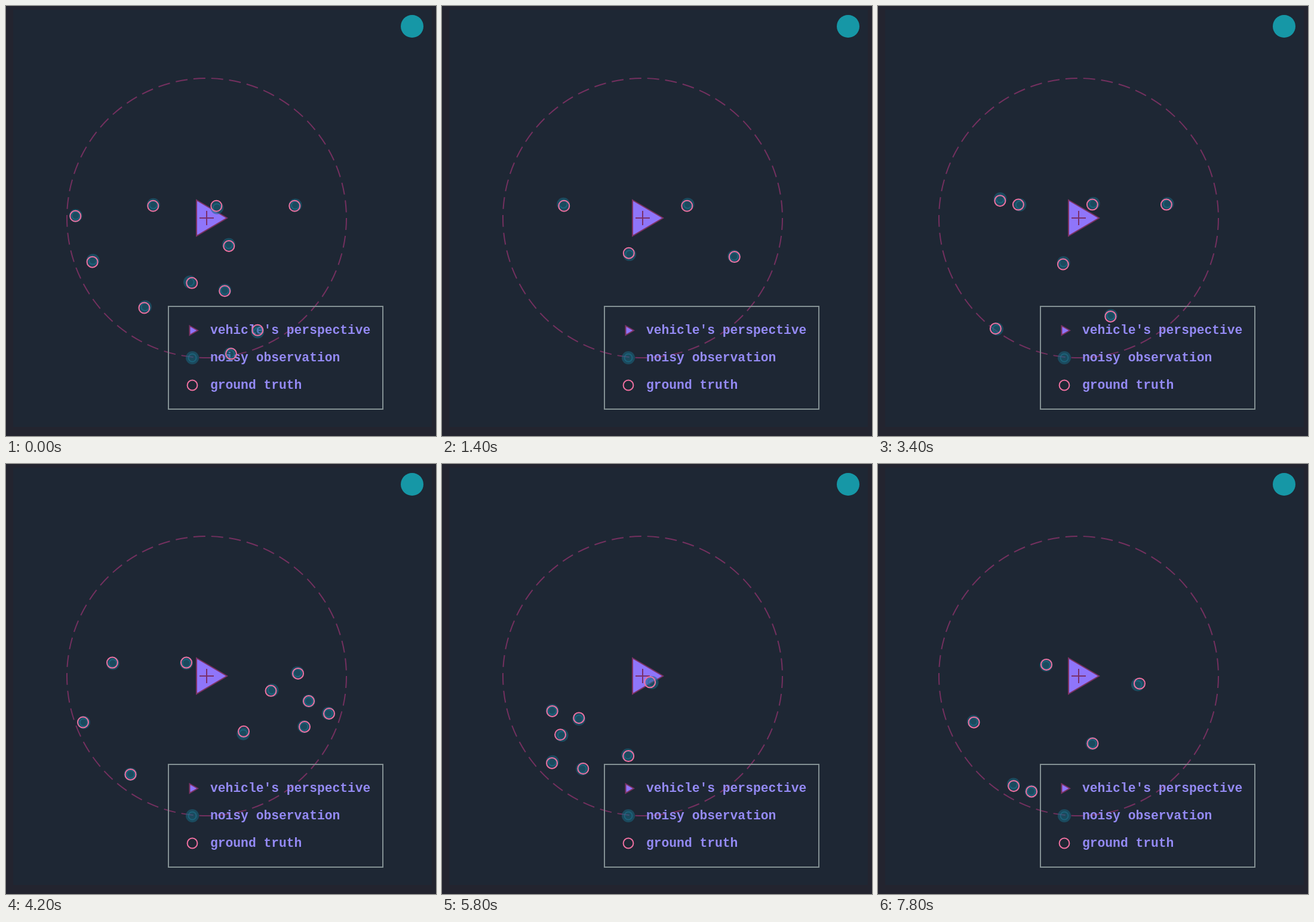
These frames come from a looping animation (720 px wide and 720 px high, 8 s). An HTML page with a canvas:

```html
<!DOCTYPE html>
<html lang="en">
<head>
<meta charset="utf-8">
<title>Vehicle's perspective</title>
<style>
  html, body { margin: 0; width: 100%; height: 100%; overflow: hidden; background: #23242f; }
  canvas { display: block; width: 720px; height: 720px; }
</style>
</head>
<body>
<canvas id="stage" width="720" height="720"></canvas>
<script>
const ctx = document.getElementById("stage").getContext("2d");
const CX = 336, CY = 355, TAU = 2 * Math.PI;
const STEP_MS = 200, STEPS = 40;
const SENSOR_RANGE = 226.4;
const Y_SCALE = 1 / 0.937;

// Landmarks stand along the straight, on curved rows, and singly around the turn.
const row = (count, place) => Array.from({ length: count }, (_, n) => place(n));
const landmarks = [
  ...row(6, n => [-1351 + 106 * n + 12.5 * n * (n - 1), -19]),
  ...row(4, n => [-1481 - n + 29.3 * n * n, 72 * n - 3]),
  ...row(3, n => [-1286 + 55 * n, 102 - 12 * n + 24.5 * n * n]),
  ...row(2, n => [-668.5 + 177 * n, 55 + 6 * n]),
  ...row(3, n => [-101 + 124 * n, -21]),
  ...row(3, n => [243 + 45.5 * n, 87 - 82 * n + 18.3 * n * n]),
  [-1224, 44], [-131.5, -27], [-26, 72.6], [53.5, 154.5], [-139, 173.5],
  [386, 59], [345, 79.6], [352, 39.4], [290, 199], [-297, 157.5], [-227, 57]
];

// The turn after the straight, as waypoints.
const turn = [
  { step: 21, x: 181, y: 0, heading: 0 },
  { step: 29, x: 305.5, y: 198.6, heading: 140 },
  { step: 36, x: 19, y: 165, heading: 189.1 },
  { step: 39, x: -194.4, y: 160.4, heading: 175 }
];

// Brakes along the straight, then follows Hermite curves, facing along the path.
function poseAt(step) {
  const left = turn[0].step - step;
  if (left >= 0) return { x: turn[0].x - 39.7 * left - 1.38 * left * left, y: 0, heading: 0 };
  const next = turn.findIndex(point => point.step >= step);
  const from = turn[next - 1], to = turn[next];
  const u = (step - from.step) / (to.step - from.step);
  const pull = 1.2 * Math.hypot(to.x - from.x, to.y - from.y);
  const axis = (key, trig) => {
    const m0 = pull * trig(from.heading * TAU / 360), m1 = pull * trig(to.heading * TAU / 360);
    const span = to[key] - from[key];
    const a = m0 + m1 - 2 * span, b = 3 * span - 2 * m0 - m1;
    return [((a * u + b) * u + m0) * u + from[key], (3 * a * u + 2 * b) * u + m0];
  };
  const [x, dx] = axis("x", Math.cos), [y, dy] = axis("y", Math.sin);
  return { x, y, heading: Math.atan2(dy, dx) };
}

function random(seed) {
  const r = Math.sin(seed * 12.9898 + 4.1) * 43758.5453;
  return r - Math.floor(r);
}
const noise = seed => (random(seed) + random(seed + 0.37) - 1) * 4;

function paint(fill, stroke) {
  if (fill) { ctx.fillStyle = fill; ctx.fill(); }
  if (stroke) { ctx.strokeStyle = stroke; ctx.stroke(); }
}

function circle(x, y, r, fill, stroke) {
  ctx.beginPath();
  ctx.arc(x, y, r, 0, TAU);
  paint(fill, stroke);
}

function triangle(left, top, right, bottom) {
  ctx.beginPath();
  ctx.moveTo(left, top);
  ctx.lineTo(right, (top + bottom) / 2);
  ctx.lineTo(left, bottom);
  ctx.closePath();
  paint("#8f75fa", "#7b3263");
}

function observation(x, y) {
  circle(x, y, 11, "rgba(26, 104, 130, 0.55)");
  circle(x, y, 6.5, null, "rgba(30, 118, 146, 0.55)");
}

const truth = (x, y) => circle(x, y, 9, null, "#f070a0");

function drawBackdrop() {
  ctx.fillStyle = "#23242f";
  ctx.fillRect(0, 0, 720, 720);
  ctx.fillStyle = "#1e2734";
  ctx.fillRect(12, 6, 701, 699);
  circle(680, 34, 19, "#1697a6");
  ctx.lineWidth = 2;
  ctx.setLineDash([20, 10]);
  circle(CX, CY, 234, null, "#74305f");
  ctx.setLineDash([]);
}

function drawVehicle() {
  triangle(319, 325, 370, 385);
  ctx.beginPath();
  ctx.moveTo(CX - 12, CY);
  ctx.lineTo(CX + 12, CY);
  ctx.moveTo(CX, CY - 12);
  ctx.lineTo(CX, CY + 12);
  paint(null, "#7b2f6a");
}

function drawLegend() {
  ctx.strokeStyle = "#839093";
  ctx.strokeRect(272, 503, 359, 172);
  triangle(307.5, 535.5, 321, 551);
  observation(312, 589);
  circle(312, 635, 8.4, null, "#f070a0");
  ctx.fillStyle = "#948af5";
  ctx.font = 'bold 21.3px "Courier New", "Liberation Mono", monospace';
  ["vehicle's perspective", "noisy observation", "ground truth"]
    .forEach((label, line) => ctx.fillText(label, 342, 549 + 46 * line));
}

function drawLandmarks(step) {
  const { x, y, heading } = poseAt(step);
  const c = Math.cos(heading), s = Math.sin(heading);
  landmarks.forEach(([lx, ly], i) => {
    const dx = lx - x, dy = ly - y;
    if (Math.hypot(dx, dy) > SENSOR_RANGE) return;
    const px = CX + c * dx + s * dy;
    const py = CY + (c * dy - s * dx) * Y_SCALE;
    const seed = step * 71 + i * 2;
    observation(px + noise(seed), py + noise(seed + 1));
    truth(px, py);
  });
}

function render(now) {
  drawBackdrop();
  drawVehicle();
  drawLegend();
  drawLandmarks(Math.floor(now / STEP_MS) % STEPS);
}

const start = performance.now();
function tick() {
  render(performance.now() - start);
  requestAnimationFrame(tick);
}
tick();
</script>
</body>
</html>
```
